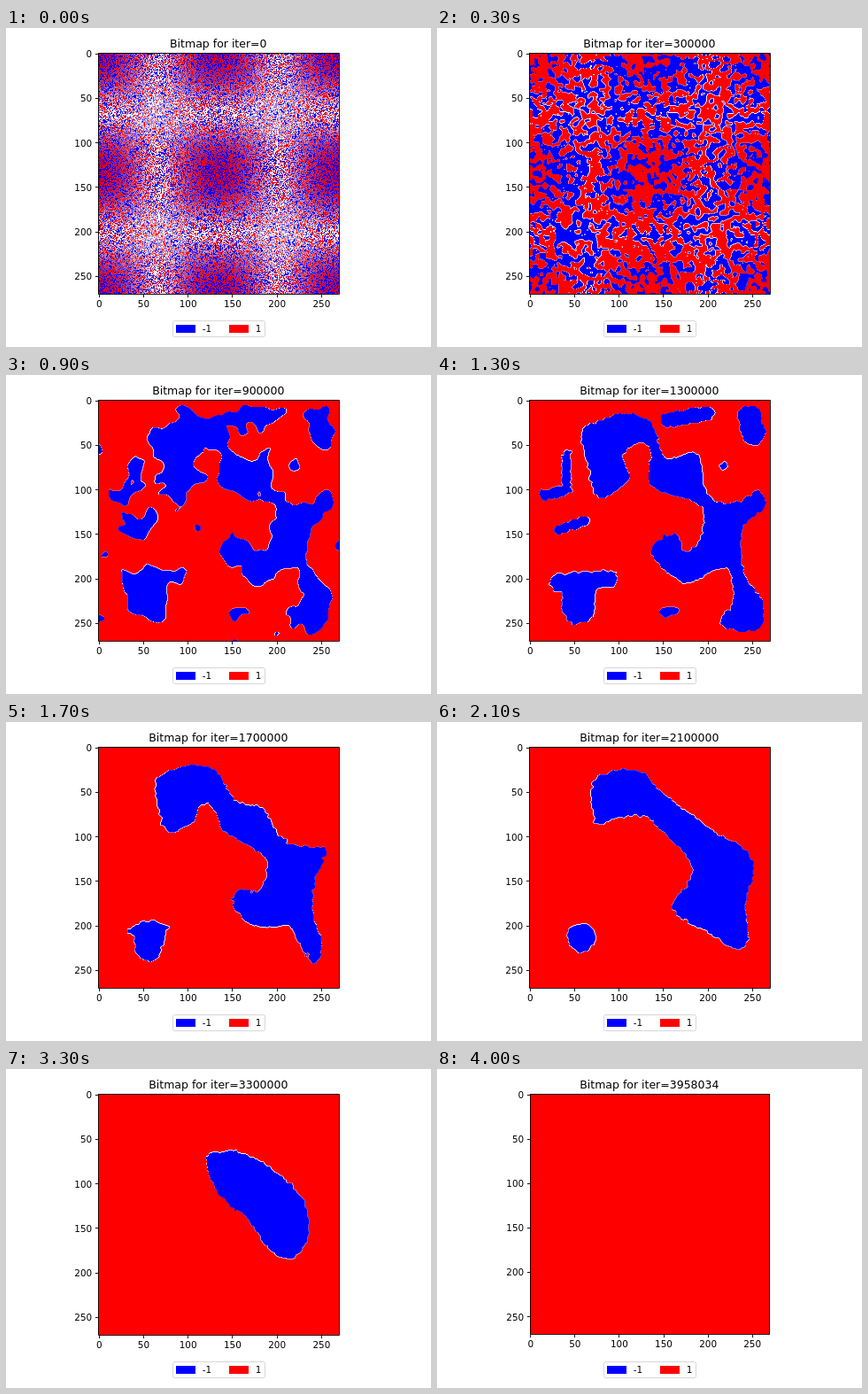
Recreate the animation shown at these times as an HTML page with a canvas. Size 480x360 px, loop 4100 ms.

```html
<!DOCTYPE html>
<html lang="en">
<head>
<meta charset="utf-8">
<title>Bitmap</title>
<style>
  html, body { margin: 0; width: 100%; height: 100%; overflow: hidden; background: #fff; }
  canvas { position: absolute; left: 104px; top: 28px; }
  svg { position: absolute; left: 0; top: 0; font-family: "DejaVu Sans", sans-serif; font-size: 10.42px; }
</style>
</head>
<body>
<canvas id="map" width="272" height="272"></canvas>
<svg id="axes" width="480" height="360"></svg>
<script>
const N = 270, W = 272, SIZE = N * N;
const STEP = 100, FRAMES = 41, LAST_ITER = 3958034;
const axes = document.getElementById('axes');
const ctx = document.getElementById('map').getContext('2d');
const image = ctx.createImageData(W, W);
const clamp = (v, lo, hi) => Math.max(lo, Math.min(hi, v));

// Blue domains by step, in stage pixels: a smooth closed outline and rods "x1,y1,x2,y2,radius"
const shapes = [
  { at: 13,
    outline: '164,64 185,51 216,44 241,55 251,80 259,95 288,87 298,100 302,128 318,144 343,141 362,131 ' +
      '369,150 345,171 346,225 366,253 364,284 335,287 318,275 333,258 331,225 316,218 279,234 245,206 ' +
      '246,190 270,178 280,200 299,178 294,145 242,126 241,84 226,77 209,92 217,118 183,139 170,100',
    rods: '261,52,304,44,8 352,48,356,66,13 322,103,323,103,4 147,90,146,128,5 146,130,122,135,6 ' +
      '138,174,168,165,5 256,266,267,265,5 138,234,194,230,10 160,240,160,262,18' },
  { at: 21,
    outline: '176,68 206,55 233,58 250,76 281,100 320,129 344,140 357,164 348,205 349,250 327,252 309,238 ' +
      '282,225 265,207 286,176 282,152 251,121 235,107 204,108 179,114',
    rods: '163,242,163,244,15' },
  { at: 27,
    outline: '196,70 230,70 262,86 280,106 303,116 335,130 350,150 350,195 333,228 290,224 279,195 271,162 ' +
      '244,134 206,109 192,92' },
  { at: 33, outline: '226,100 245,93 275,98 310,121 336,150 340,190 322,213 297,204 270,166 240,142' },
  { at: 36, rods: '273,136,302,168,29' },
  { at: 39, rods: '287,150,290,153,15' }
];

const parse = (s = '') => s.split(' ').filter(Boolean).map(p => p.split(',').map(Number));

// Closed Catmull-Rom curve through the points
function smooth(pts) {
  const at = i => pts[(i + pts.length) % pts.length];
  return pts.flatMap((p, i) => [0, 0.25, 0.5, 0.75].map(t => p.map((b, c) => {
    const a = at(i - 1)[c], d = at(i + 1)[c], e = at(i + 2)[c];
    return b + t / 2 * (d - a + t * (2 * a - 5 * b + 4 * d - e + t * (3 * (b - d) + e - a)));
  })));
}

const segment = (x, y, x2, y2, r = 0) => {
  const dx = x2 - x, dy = y2 - y;
  return { x, y, dx, dy, r, q: 1 / (dx * dx + dy * dy) };
};

function squared(s, x, y) {
  const px = x - s.x, py = y - s.y;
  const t = clamp((px * s.dx + py * s.dy) * s.q, 0, 1);
  return (px - t * s.dx) ** 2 + (py - t * s.dy) ** 2;
}

// Signed distance to a shape, positive inside
function distance({ outline, rods }) {
  const pts = smooth(parse(outline));
  const edges = pts.map((p, i) => segment(...p, ...pts[(i + 1) % pts.length]));
  const bars = parse(rods).map(r => segment(...r));
  return Float32Array.from({ length: SIZE }, (_, i) => {
    const x = i % N + 105.3, y = Math.floor(i / N) + 29.3;
    let near = 1e6, inside = false;
    for (const s of edges) {
      near = Math.min(near, squared(s, x, y));
      const py = y - s.y;
      if ((py < 0) !== (py < s.dy) && x - s.x < py * s.dx / s.dy) inside = !inside;
    }
    let d = Math.sqrt(near) * (inside ? 1 : -1);
    for (const s of bars) d = Math.max(d, s.r - Math.sqrt(squared(s, x, y)));
    return d;
  });
}

const keys = shapes.map(s => ({ at: s.at, field: distance(s) }));

function random(seed) {
  return () => {
    seed = seed + 0x6D2B79F5 | 0;
    let t = Math.imul(seed ^ seed >>> 15, 1 | seed);
    t = t + Math.imul(t ^ t >>> 7, 61 | t) ^ t;
    return ((t ^ t >>> 14) >>> 0) / 4294967296;
  };
}

// Gaussian blur, rescaled to zero mean and unit deviation
function blur(src, sigma) {
  const r = Math.ceil(sigma * 2.5);
  const kernel = Array.from({ length: 2 * r + 1 }, (_, i) => Math.exp(-((i - r) ** 2) / (2 * sigma * sigma)));
  const pass = (a, sx, sy) => {
    const out = new Float32Array(SIZE);
    for (let y = 0; y < N; y++) for (let x = 0; x < N; x++) {
      let sum = 0;
      for (let j = -r; j <= r; j++) sum += kernel[j + r] * a[clamp(x + j, 0, N - 1) * sx + y * sy];
      out[x * sx + y * sy] = sum;
    }
    return out;
  };
  const out = pass(pass(src, 1, N), N, 1);
  let mean = 0, sq = 0;
  for (const v of out) { mean += v; sq += v * v; }
  mean /= SIZE;
  const dev = Math.sqrt(sq / SIZE - mean * mean);
  return out.map(v => (v - mean) / dev);
}

const rnd = random(7);
const spins = Float32Array.from({ length: SIZE }, () => rnd() < 0.5 ? 1 : -1);
const visit = Float32Array.from({ length: SIZE }, () => -Math.log(1 - rnd()));
const rough = blur(spins, 1.6);

// Early drift toward the later domains, with a red rim
const pull = keys[0].field.map((d, i) => {
  const x = i % N, y = Math.floor(i / N);
  const rim = Math.min(x, y, N - 1 - x, N - 1 - y) < 4 ? 1 : 0;
  return 0.4 * clamp(d / 10, -1, 1) - 0.1 - rim;
});
const coarse = blur(spins, 3).map((v, i) => v + pull[i]);

// Positive where a cell is blue
function fieldAt(k) {
  if (k <= 6) {
    const f = blur(spins, 0.9 + 0.35 * k);
    return f.map((v, i) => visit[i] < k * 1e5 / SIZE ? v + k / 6 * pull[i] : spins[i]);
  }
  if (k < 13) {
    const u = (k - 6) / 7, f = blur(coarse, 0.5 + 7 * u);
    return f.map((v, i) => (1 - u) * (v - 0.2) + u * clamp(keys[0].field[i] / 6, -2, 2));
  }
  let n = 0;
  while (n < keys.length - 2 && k >= keys[n + 1].at) n++;
  const a = keys[n], b = keys[n + 1], u = (k - a.at) / (b.at - a.at);
  return a.field.map((v, i) => v + (b.field[i] - v) * u + 0.8 * rough[i]);
}

// Resampling taps for one image axis
const taps = Array.from({ length: W }, (_, i) => {
  const p = clamp((i + 0.5) * N / W - 0.5, 0, N - 1);
  const a = Math.floor(p);
  return { a, b: Math.min(a + 1, N - 1), w: 0.5 - 0.5 * Math.cos(Math.PI * (p - a)) };
});

function drawMap(k) {
  if (k === FRAMES - 1) {
    ctx.clearRect(0, 0, W, W);
    ctx.fillStyle = '#f00';
    ctx.fillRect(1, 0, 271, 271);
    return;
  }
  const cells = k ? fieldAt(k).map(v => v > 0 ? -1 : 1) : spins;
  let o = 0;
  for (const ty of taps) for (const tx of taps) {
    const r0 = ty.a * N, r1 = ty.b * N;
    const top = cells[r0 + tx.a] * (1 - tx.w) + cells[r0 + tx.b] * tx.w;
    const low = cells[r1 + tx.a] * (1 - tx.w) + cells[r1 + tx.b] * tx.w;
    const v = top * (1 - ty.w) + low * ty.w;
    image.data[o++] = 255 * Math.min(1, 1 + v);
    image.data[o++] = 255 * (1 - Math.abs(v));
    image.data[o++] = 255 * Math.min(1, 1 - v);
    image.data[o++] = 255;
  }
  ctx.putImageData(image, 0, 0);
}

const text = (x, y, s, anchor = 'start', extra = '') =>
  `<text x="${x}" y="${y}" text-anchor="${anchor}" ${extra}>${s}</text>`;

function drawAxes(k) {
  const last = k === FRAMES - 1;
  const x0 = last ? 105.5 : 104.5, x1 = last ? 375.5 : 376.5, y1 = last ? 299.5 : 300.5;
  const scale = last ? 1.002 : 1.005;
  const snap = v => Math.floor(v) + 0.5;
  let lines = `M${x0} 28.5H${x1}V${y1}H${x0}Z`, labels = '';
  for (let v = 0; v <= 250; v += 50) {
    const d = (v + 0.5) * scale, x = (last ? 105.2 : 104.7) + d, y = 28.6 + d;
    lines += `M${snap(x)} ${y1}v3.65M${x0} ${snap(y)}h-3.65`;
    labels += text(x, y1 + 14.3, v, 'middle') + text(x0 - 7.3, y + 3.9, v, 'end');
  }
  const iter = last ? LAST_ITER : k * 100000;
  axes.innerHTML =
    `<path d="${lines}" fill="none" stroke="#000" stroke-width=".9"/>` + labels +
    text(239.8, 22, 'Bitmap for iter=' + iter, 'middle', 'font-size="12.5"') +
    '<rect x="188.5" y="330.5" width="104" height="18" rx="2" fill="#fff" stroke="#d6d6d6"/>' +
    '<rect x="192" y="335" width="22" height="9" fill="#00f"/>' + text(221.8, 343, '-1') +
    '<rect x="252" y="335" width="22" height="9" fill="#f00"/>' + text(281.8, 343, '1');
}

let shown = -1;
function tick() {
  const k = Math.floor(performance.now() / STEP) % FRAMES;
  if (k !== shown) {
    shown = k;
    drawMap(k);
    drawAxes(k);
  }
  requestAnimationFrame(tick);
}
tick();
</script>
</body>
</html>
```
